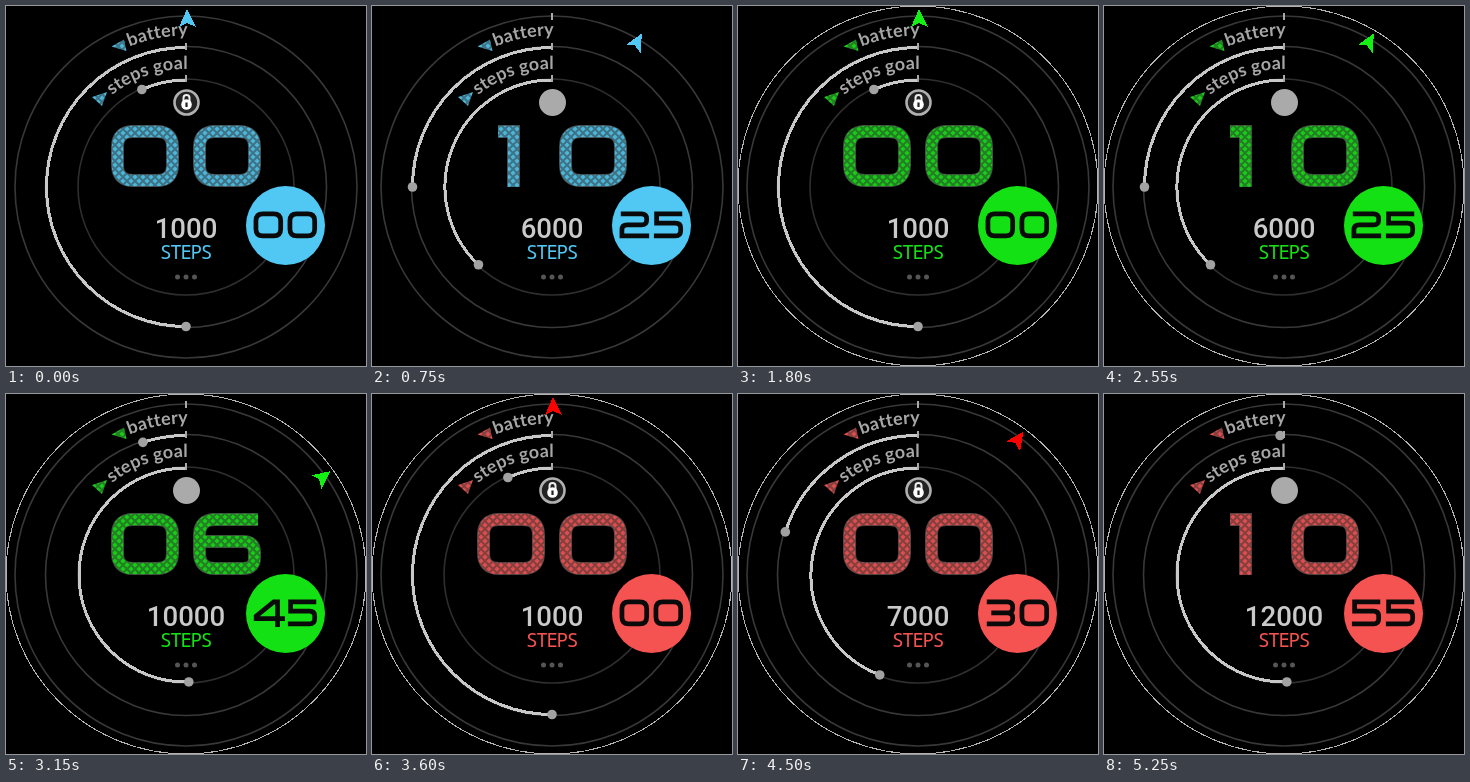
An HTML page for the animation above (5400 ms loop, 360 px wide and 360 px high).

```html
<!DOCTYPE html>
<html lang="en">
<head>
<meta charset="utf-8">
<title>Watch face</title>
<style>
  html, body { margin: 0; width: 100%; height: 100%; overflow: hidden; background: #000; }
  svg { display: block; width: 100vw; height: 100vh; }
  .rings circle { fill: none; stroke: #383838; stroke-width: 1.6; }
  .gauge path { fill: none; stroke: #c8c8c8; stroke-width: 3; shape-rendering: crispEdges; }
  .gauge circle { fill: #a2a2a2; }
  .label { font: 700 18px Lato, "Open Sans", sans-serif; fill: #a6a6a6; text-anchor: end; letter-spacing: .2px; }
  .accent { fill: currentColor; }
  .digits path { fill: none; stroke-linejoin: miter; }
  #rim, #arrow { shape-rendering: crispEdges; }
  #count { font: 500 27.6px Roboto, sans-serif; fill: #cacaca; text-anchor: middle; }
  #unit { font: 400 19.2px "Noto Sans Mono", monospace; letter-spacing: -1.3px; text-anchor: middle; }
</style>
</head>
<body>
<svg viewBox="0 0 360 360">
  <defs>
    <pattern id="weave" width="8" height="8" patternUnits="userSpaceOnUse">
      <rect width="8" height="8" class="accent"/>
      <rect width="8" height="8" fill="#303030" fill-opacity=".12"/>
      <path d="M-1 -1L9 9M9 -1L-1 9" stroke="#303030" stroke-opacity=".5" stroke-width="2.1"/>
    </pattern>
    <path id="outerText" d="M29 181A151.5 151.5 0 0 1 182 29.5"/>
    <path id="innerText" d="M62 181A118 118 0 0 1 182 63"/>
  </defs>

  <rect width="360" height="360"/>
  <circle id="rim" cx="180" cy="180" r="180" fill="none" stroke="#b4b4b4"/>
  <g class="rings">
    <circle cx="180" cy="181" r="171"/>
    <circle cx="180" cy="181" r="140.5"/>
    <circle cx="180" cy="181" r="108" style="stroke: #2e2e2e"/>
  </g>

  <g class="gauge" id="battery"><path/><circle r="4.8"/></g>
  <g class="gauge" id="steps"><path/><circle r="4.8"/></g>
  <path d="M180 7V14M180 37V44M180 69V76" stroke="#a8a8a8" stroke-width="2"/>

  <text class="label"><textPath href="#outerText" startOffset="100%">battery</textPath></text>
  <text class="label"><textPath href="#innerText" startOffset="100%">steps goal</textPath></text>
  <path d="M105.5 40.5L118 33.5L120.5 45ZM86 91L101 86L96 100Z" fill="url(#weave)"/>
  <path id="arrow" class="accent" d="M181 3L190 21L181 17L173 21Z"/>

  <circle id="button" cx="180.5" cy="96.5" r="13.5" fill="#aaa"/>
  <g id="lock">
    <circle cx="180.5" cy="96.5" r="12" fill="#222" stroke="#b0b0b0" stroke-width="2.6"/>
    <path d="M177.5 96V92A3 3 0 0 1 183.5 92V96" fill="none" stroke="#eee" stroke-width="2"/>
    <circle cx="180.5" cy="98.5" r="5.3" fill="#fff"/>
    <path d="M180.5 96.5V101" stroke="#222" stroke-width="2.2"/>
  </g>

  <g class="digits" id="hours"></g>
  <text id="count" x="180" y="231.5"></text>
  <text id="unit" class="accent" x="179.5" y="252.8">STEPS</text>
  <g fill="#555">
    <circle cx="171.5" cy="271" r="2.5"/>
    <circle cx="180" cy="271" r="2.5"/>
    <circle cx="188.5" cy="271" r="2.5"/>
  </g>
  <circle class="accent" cx="279.5" cy="219.5" r="39.5"/>
  <g class="digits" id="minutes"></g>
</svg>

<script>
const STEP = 150, STATES = 12;
const THEMES = [
  { color: "#50c8f3", arrow: "#50c8f3", rim: false },
  { color: "#14e114", arrow: "#14f014", rim: true },
  { color: "#f55252", arrow: "#ff0000", rim: true }
];

// Centre lines of wide digits in a 68 x 62 cell.
const GLYPHS = {
  0: "M22 6.5H46Q61.5 6.5 61.5 22V40Q61.5 55.5 46 55.5H22Q6.5 55.5 6.5 40V22Q6.5 6.5 22 6.5Z",
  1: "M21 6.5H36.5V62",
  2: "M4 6.5H50Q61.5 6.5 61.5 18V20Q61.5 31 50 31H18Q6.5 31 6.5 42V55.5H67",
  3: "M4 6.5H50Q61.5 6.5 61.5 18V20Q61.5 31 50 31H14M50 31Q61.5 31 61.5 42V44Q61.5 55.5 50 55.5H4",
  4: "M54.5 62V6.5H46L7 38V43.5H71",
  5: "M65 6.5H8V27H50Q61.5 27 61.5 38V44Q61.5 55.5 50 55.5H2",
  6: "M65 6.5H22Q6.5 6.5 6.5 22V40Q6.5 55.5 22 55.5H50Q61.5 55.5 61.5 45V39Q61.5 28.5 50 28.5H7",
  8: "M20 6.5H48Q59.5 6.5 59.5 17V19Q59.5 30 48 30H20Q8.5 30 8.5 19V17Q8.5 6.5 20 6.5ZM20 30H48Q61.5 30 61.5 42V44Q61.5 55.5 48 55.5H20Q6.5 55.5 6.5 44V42Q6.5 30 20 30Z"
};

const $ = id => document.getElementById(id);
const svg = document.querySelector("svg");
const show = (id, visible) => $(id).setAttribute("visibility", visible ? "visible" : "hidden");

function drawDigits(id, value, x, y, pitch, scale, strokes) {
  $(id).innerHTML = [...String(value).padStart(2, "0")].map((digit, i) =>
    `<g transform="translate(${x + i * pitch} ${y}) scale(${scale})">` +
    strokes.map(([paint, width]) =>
      `<path d="${GLYPHS[digit]}" stroke="${paint}" stroke-width="${width}"/>`).join("") +
    "</g>").join("");
}

// Sweeps counter-clockwise from the top of the dial.
function drawGauge(id, radius, degrees) {
  const a = degrees * Math.PI / 180;
  const x = 180 - radius * Math.sin(a), y = 181 - radius * Math.cos(a);
  const [arc, dot] = $(id).children;
  const large = degrees > 180 ? 1 : 0;
  arc.setAttribute("d", `M180 ${181 - radius}A${radius} ${radius} 0 ${large} 0 ${x} ${y}`);
  dot.setAttribute("cx", x);
  dot.setAttribute("cy", y);
}

function render(tick) {
  const theme = THEMES[Math.floor(tick / STATES)];
  const s = tick % STATES;
  svg.style.color = theme.color;
  show("rim", theme.rim);

  $("arrow").style.fill = theme.arrow;
  $("arrow").setAttribute("transform", `rotate(${s * 6} 180 181)`);
  show("arrow", s < 10);

  drawGauge("battery", 139.5, Math.max(1.6, 180 - s * 18));
  drawGauge("steps", 107, 1.9 + 22.45 * Math.min(s + 1, 8));
  show("lock", s % 2 === 0);
  show("button", s % 2 === 1);

  drawDigits("hours", s * 2 % 12, 105, 119, 82, 1, [["#444", 13], ["url(#weave)", 11.4]]);
  drawDigits("minutes", s * 5, 247, 205, 34, .45, [["#0a0a0a", 10.5]]);
  $("count").textContent = (s + 1) * 1000;
}

let shown = -1;
function frame() {
  const tick = Math.floor(performance.now() / STEP) % (STATES * THEMES.length);
  if (tick !== shown) render(shown = tick);
  requestAnimationFrame(frame);
}
frame();
</script>
</body>
</html>
```
